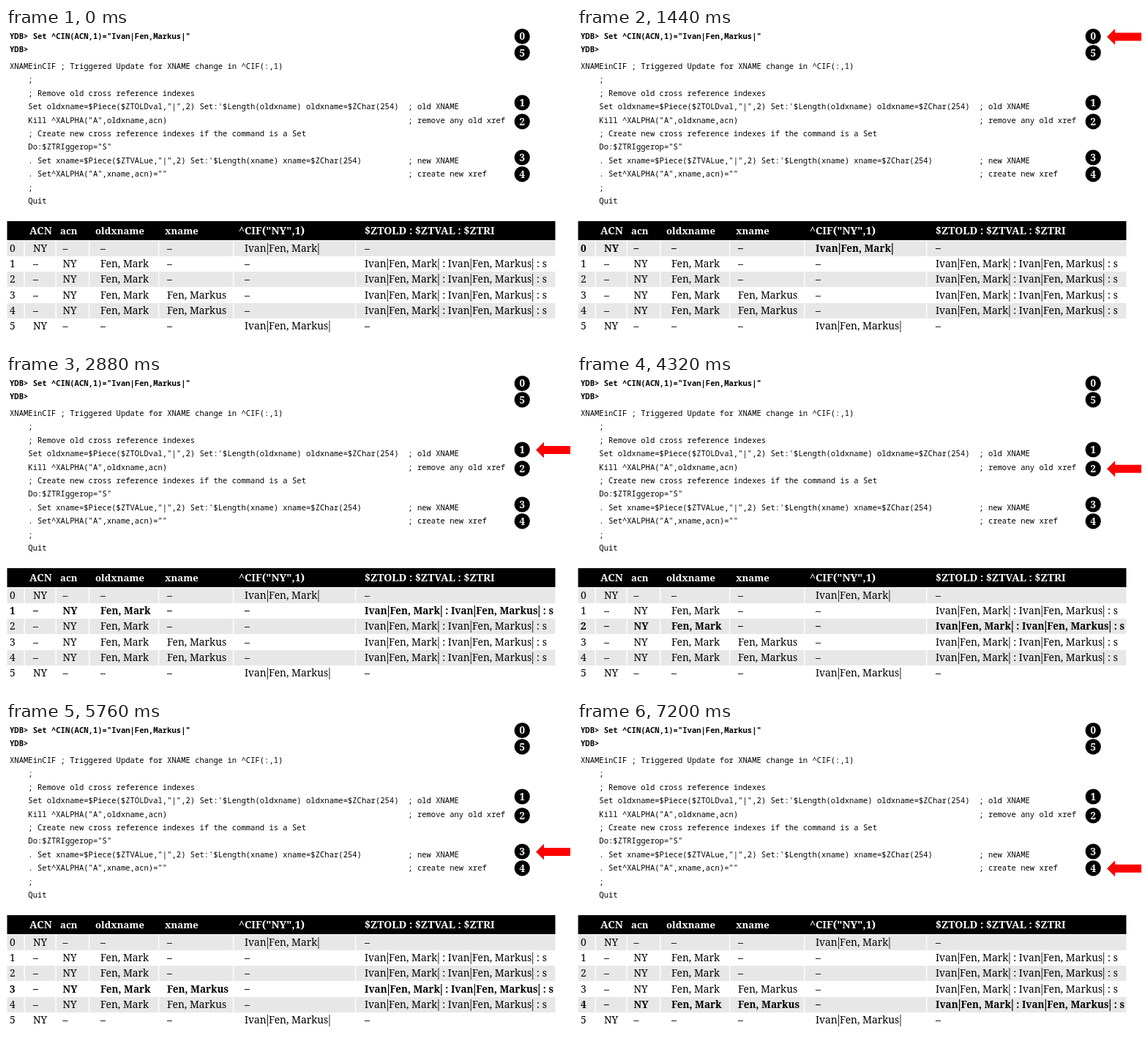
An HTML page with a canvas that plays this animation: 772 by 436 pixels, repeating every 8 s.

```html
<!DOCTYPE html>
<html lang="en">
<head>
<meta charset="utf-8">
<title>Trigger walkthrough</title>
<style>
html, body { margin: 0; width: 100%; height: 100%; overflow: hidden; background: #fff; }
canvas { display: block; width: 772px; height: 436px; }
</style>
</head>
<body>
<canvas id="stage"></canvas>
<script>
const W = 772, H = 436, STEP = 1440, LOOP = 8000;
const MONO = '"Noto Sans Mono", "DejaVu Sans Mono", monospace';
const SERIF = '"Noto Serif", "Liberation Serif", serif';
const BAR_FONT = '"Liberation Serif", serif';

const canvas = document.getElementById('stage');
const ctx = canvas.getContext('2d');
const ratio = window.devicePixelRatio || 1;
canvas.width = W * ratio;
canvas.height = H * ratio;
ctx.scale(ratio, ratio);

const SHORT = 'Fen, Mark', LONG = 'Fen, Markus';
const OLD = `Ivan|${SHORT}|`, NEW = `Ivan|${LONG}|`;
const CHANGE = `${OLD} : ${NEW} : s`;

const PROMPT = ['YDB> Set ^CIN(ACN,1)="Ivan|Fen,Markus|"', 'YDB>'];
const COMMENT_COL = 86;
const CODE = [
  ['XNAMEinCIF ; Triggered Update for XNAME change in ^CIF(:,1)'],
  ['    ;'],
  ['    ; Remove old cross reference indexes'],
  ['    Set oldxname=$Piece($ZTOLDval,"|",2) Set:\'$Length(oldxname) oldxname=$ZChar(254)', '; old XNAME'],
  ['    Kill ^XALPHA("A",oldxname,acn)', '; remove any old xref'],
  ['    ; Create new cross reference indexes if the command is a Set'],
  ['    Do:$ZTRIggerop="S"'],
  ['    . Set xname=$Piece($ZTVALue,"|",2) Set:\'$Length(xname) xname=$ZChar(254)', '; new XNAME'],
  ['    . Set^XALPHA("A",xname,acn)=""', '; create new xref'],
  ['    ;'],
  ['    Quit']
];

const HEAD = ['ACN', 'acn', 'oldxname', 'xname', '^CIF("NY",1)', '$ZTOLD : $ZTVAL : $ZTRI'];
const HEAD_X = [32, 74, 122, 217, 318, 490];
const CELL_X = [5, 37, 77.5, 129, 220, 326, 490];
const RULES = [24.5, 67.5, 113, 208, 310, 477];
const ROWS = [
  ['NY', '–', '–', '–', OLD, '–'],
  ['–', 'NY', SHORT, '–', '–', CHANGE],
  ['–', 'NY', SHORT, '–', '–', CHANGE],
  ['–', 'NY', SHORT, LONG, '–', CHANGE],
  ['–', 'NY', SHORT, LONG, '–', CHANGE],
  ['NY', '–', '–', '–', NEW, '–']
];
const TABLE_X = 1.5, TABLE_W = 749;
const ROW_TOP = 291, ROW_H = 21.2;
const BADGE_X = 705.3;
const BADGE_Y = [11.5, 102, 127.8, 177, 199.8, 33.8];

function text(str, x, y, font, color = '#000') {
  ctx.font = font;
  ctx.fillStyle = color;
  ctx.fillText(str, x, y);
  return ctx.measureText(str).width;
}

// Serif text with slim vertical bars.
function serif(str, x, y, bold) {
  const style = bold ? `bold 13.5px ${SERIF}` : `13.8px ${SERIF}`;
  const bar = `${bold ? 'bold ' : ''}17px ${BAR_FONT}`;
  for (const part of str.split(/(\|)/)) {
    x += text(part, x, y, part === '|' ? bar : style);
  }
}

function drawCode() {
  const font = `10.56px ${MONO}`;
  PROMPT.forEach((line, i) => text(line, 5, 15 + i * 18.4, 'bold ' + font));
  CODE.forEach(([code, note], i) => {
    const line = note ? code.padEnd(COMMENT_COL) + note : code;
    text(line, 5, 56 + i * 18.4, font);
  });
}

function drawBadges() {
  ctx.textAlign = 'center';
  BADGE_Y.forEach((y, i) => {
    ctx.fillStyle = '#000';
    ctx.beginPath();
    ctx.arc(BADGE_X, y, 10.6, 0, Math.PI * 2);
    ctx.fill();
    text(i, BADGE_X, y + 4.8, `600 13.5px ${SERIF}`, '#fff');
  });
  ctx.textAlign = 'left';
}

function drawTable(active) {
  ctx.fillStyle = '#000';
  ctx.fillRect(TABLE_X, 264, TABLE_W, 26);
  HEAD.forEach((label, i) => {
    const size = /[A-Z]/.test(label) ? 14.1 : 13.2;
    text(label, HEAD_X[i], 281.5, `bold ${size}px ${SERIF}`, '#fff');
  });

  ROWS.forEach((row, r) => {
    const top = Math.round(ROW_TOP + r * ROW_H);
    if (r % 2 === 0) {
      ctx.fillStyle = '#e7e7e7';
      ctx.fillRect(TABLE_X, top, TABLE_W, 21);
      ctx.fillStyle = '#fff';
      RULES.forEach(x => ctx.fillRect(x, top, 1.3, 21));
    }
    const base = 306 + r * ROW_H;
    [String(r), ...row].forEach((cell, c) => serif(cell, CELL_X[c], base, r === active));
  });
}

function drawArrow(y) {
  const points = [[724, 0], [735, -11], [735, -5.5], [771, -5.5], [771, 5.5], [735, 5.5], [735, 11]];
  ctx.fillStyle = '#f00';
  ctx.beginPath();
  points.forEach(([x, dy]) => ctx.lineTo(x, y + dy));
  ctx.fill();
}

function draw(time) {
  const active = Math.floor((time % LOOP) / STEP) - 1;
  ctx.fillStyle = '#fff';
  ctx.fillRect(0, 0, W, H);
  drawCode();
  drawBadges();
  drawTable(active);
  if (active >= 0) drawArrow(BADGE_Y[active] + 0.5);
}

const start = performance.now();
function tick() {
  draw(performance.now() - start);
  requestAnimationFrame(tick);
}
tick();
</script>
</body>
</html>
```
